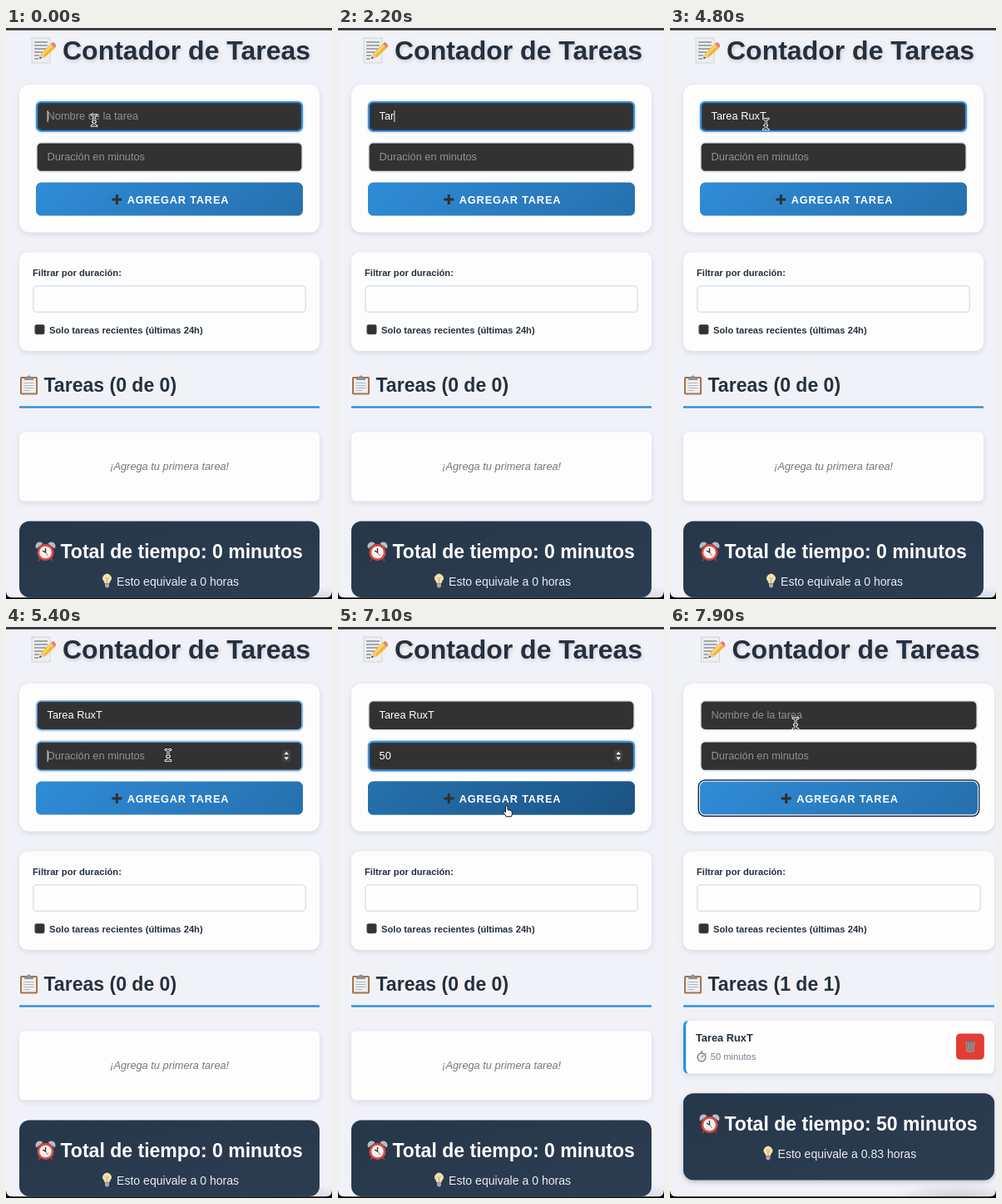
Recreate the animation shown at these times as an HTML page. Size 392 by 686 pixels, loop 8000 ms.

```html
<!DOCTYPE html>
<html lang="es">
<head>
<meta charset="utf-8">
<title>Contador de Tareas</title>
<style>
html, body { margin: 0; width: 100%; height: 100%; overflow: hidden; background: #08080a; }
svg { display: block; width: 392px; height: 686px; --w: 0px;
  font-family: "Liberation Sans", Arial, sans-serif; font-size: 12.8px; fill: #24303f; }
svg.wide { --w: 13px; }
.grow { width: calc(var(--b) + var(--w)); }
.mid { transform: translateX(calc(var(--w) / 2)); }
.bold { font-weight: bold; }
.small { font-size: 11.2px; }
.head { font-size: 23.04px; }
.center { text-anchor: middle; }
.card { fill: #fdfdfe; filter: drop-shadow(0 2px 3px rgba(30, 40, 60, .13)); }
.line { fill: #2d8fdc; }
.field { fill: #323232; stroke: #dfe4ee; stroke-width: 1.6; }
.focus { fill: none; stroke: #2f8fe0; stroke-width: 1.8; filter: drop-shadow(0 0 1.5px rgba(47, 143, 224, .45)); }
.hint { fill: #8c9299; }
.typed { fill: #fff; }
.title { font-size: 32px; filter: drop-shadow(1px 2px 2px rgba(0, 0, 0, .16)); }
.wide .before, svg:not(.wide) .after { display: none; }
.wide .total { transform: translateY(-32px); }
</style>
</head>
<body>
<svg id="stage" viewBox="0 0 392 686">
  <defs>
    <linearGradient id="blue" gradientUnits="userSpaceOnUse" x1="106" y1="115" x2="287" y2="296">
      <stop stop-color="#2f8cd7"/><stop offset="1" stop-color="#2670ae"/>
    </linearGradient>
    <linearGradient id="navy" gradientUnits="userSpaceOnUse" x1="106" y1="115" x2="287" y2="296">
      <stop stop-color="#2671ae"/><stop offset="1" stop-color="#1b5383"/>
    </linearGradient>
    <linearGradient id="slate" x2="1" y2="1">
      <stop stop-color="#27374a"/><stop offset="1" stop-color="#2c3d51"/>
    </linearGradient>
    <radialGradient id="shade">
      <stop stop-color="#556" stop-opacity=".22"/><stop offset="1" stop-color="#556" stop-opacity="0"/>
    </radialGradient>
  </defs>

  <path d="M0 0H392V677Q392 684.6 384 684.6H8Q0 684.6 0 677Z" fill="#f1f2f8"/>
  <ellipse cx="345" cy="685" rx="80" ry="17" fill="url(#shade)"/>
  <rect width="392" height="2.8" fill="#393239"/>

  <!-- title -->
  <g class="mid">
    <g transform="translate(30 11)">
      <path d="M1 1H23V31H1Z" fill="#eceef0" stroke="#c9ccd0" stroke-width=".8"/>
      <path d="M4 6H20M4 10H20M4 14H18M4 18H14M4 22H10M4 26H9" stroke="#8b9096" stroke-width="1.3"/>
      <path d="M10 26L12 20L24 8L29 13L17 24Z" fill="#f3b63a"/>
      <path d="M13.5 21.5L25 10" stroke="#ffdc72" stroke-width="1.8"/>
      <path d="M24 8L26 6Q30 7 30 11L29 13Z" fill="#df7f78"/>
      <path d="M10 26L12 20L17 24Z" fill="#e9c89b"/>
      <path d="M10 26L10.8 23.6L13 25Z" fill="#333"/>
    </g>
    <text class="bold title" x="68" y="38">Contador de Tareas</text>
  </g>

  <!-- form -->
  <rect class="card grow" style="--b:361px" x="16" y="68" height="177.5" rx="12"/>
  <g id="name">
    <rect class="field grow" style="--b:319.4px" x="36.8" y="88.8" height="35" rx="5.6"/>
    <rect class="focus grow" style="--b:319.4px" x="36.8" y="88.8" height="35" rx="5.6"/>
    <text class="hint" x="49.6" y="110.2">Nombre de la tarea</text>
    <text class="typed" x="49.6" y="110.2"></text>
    <rect class="caret" y="99" width="1" height="14" fill="#e8e8e8"/>
  </g>
  <g id="minutes">
    <rect class="field grow" style="--b:319.4px" x="36.8" y="137.6" height="35" rx="5.6"/>
    <rect class="focus grow" style="--b:319.4px" x="36.8" y="137.6" height="35" rx="5.6"/>
    <text class="hint" x="49.6" y="159">Duración en minutos</text>
    <text class="typed" x="49.6" y="159"></text>
    <rect class="caret" y="148" width="1" height="14" fill="#e8e8e8"/>
    <g id="spinner">
      <rect x="332" y="147.500" width="10.500" height="14.500" rx="2.500" fill="#404040"/>
      <path d="M334.300 153.300L337.200 149.800L340.100 153.300ZM334.300 156.300L337.200 159.800L340.100 156.300Z" fill="#f4f4f4"/>
    </g>
  </g>
  <g id="button">
    <rect class="grow" style="--b:321px" x="36" y="185.600" height="40" rx="6.400" fill="url(#blue)"/>
    <rect id="hover" class="grow" style="--b:321px" x="36" y="185.600" height="40" rx="6.400" fill="url(#navy)"/>
    <g id="ring" fill="none">
      <rect class="grow" style="--b:322.200px" x="35.400" y="185" height="41.200" rx="7" stroke="#fff" stroke-width="1.200"/>
      <rect class="grow" style="--b:324.400px" x="34.300" y="183.900" height="43.400" rx="8" stroke="#17324f" stroke-width="1.500"/>
    </g>
    <g class="mid">
      <path d="M127.300 206H139.300M133.300 200V212" stroke="#2d3033" stroke-width="3"/>
      <text class="bold" x="145.800" y="210.700" fill="#fff" letter-spacing=".8">AGREGAR TAREA</text>
    </g>
  </g>

  <!-- filters -->
  <rect class="card grow" style="--b:361px" x="16" y="269.500" height="118.500" rx="10"/>
  <text class="bold small" x="32" y="297.500">Filtrar por duración:</text>
  <rect class="grow" style="--b:327.400px" x="32.800" y="309.800" height="31.600" rx="4.500" fill="#fefefe" stroke="#dde2eb" stroke-width="1.600"/>
  <rect x="34.800" y="356.500" width="11.400" height="11.400" rx="1.800" fill="#333" stroke="#5b5b5b" stroke-width=".6"/>
  <text class="bold small" x="52" y="367.200">Solo tareas recientes (últimas 24h)</text>

  <!-- task list -->
  <g transform="translate(17 417)">
    <rect y="2" width="21" height="21.500" rx="1.500" fill="#a5744d"/>
    <rect x="2" y="4" width="17" height="17.500" fill="#eceef0"/>
    <path d="M4.500 9.500H16.500M4.500 12.500H16.500M4.500 15.500H16.500M4.500 18.500H12" stroke="#b3b7bc"/>
    <path d="M5 6V3.500H8Q8 .5 10.500 .5T13 3.500H16V6Z" fill="#8d9297"/>
  </g>
  <text id="heading" class="bold head" x="45.500" y="436.800"></text>
  <rect class="line grow" style="--b:361px" x="16" y="454.300" height="2.400"/>

  <g class="before">
    <rect class="card" x="16" y="485.500" width="361" height="83" rx="6"/>
    <text class="center" x="196.700" y="531" font-style="italic" fill="#74787d">¡Agrega tu primera tarea!</text>
  </g>
  <g id="task" class="after">
    <rect class="card" x="16" y="473" width="374" height="63.500" rx="6.400"/>
    <path class="line" d="M22.400 473Q16 473 16 479.400V530.100Q16 536.500 22.400 536.500Q19.200 535 19.200 530.100V479.400Q19.200 474.500 22.400 473Z"/>
    <text class="bold" x="31" y="498">Tarea RuxT</text>
    <g fill="none" stroke="#858a90">
      <circle cx="38" cy="517" r="4.900" fill="#eef0f2" stroke-width="1.500"/>
      <path d="M38 517L40.300 514.500M36.300 510H39.700M38 510V512M42.500 511.800L43.600 513" stroke-width="1.200"/>
    </g>
    <text class="small" x="48.700" y="520" fill="#73808c">50 minutos</text>
    <rect x="344" y="488.500" width="33.800" height="31.300" rx="4.800" fill="#e23c34"/>
    <path d="M355.300 498.500H366.700L365.500 511H356.500Z" fill="#a38c8b"/>
    <path d="M357.500 500L358.500 510M361 500V510M364.500 500L363.500 510" stroke="#766463" stroke-width=".9"/>
    <ellipse cx="361" cy="498.300" rx="6.300" ry="1.500" fill="#81706f"/>
  </g>

  <!-- total -->
  <g class="total">
    <rect class="grow" style="--b:361px" x="16" y="592.500" height="91.500" rx="12" fill="url(#slate)"/>
    <rect class="grow after" style="--b:361px" x="16" y="592.500" height="104" rx="12" fill="url(#slate)" filter="drop-shadow(0 2px 3px rgba(20,30,50,.25))"/>
    <g class="total-text">
      <g transform="translate(35.500 617)">
        <path d="M5.500 20L3.500 23.500M18.500 20L20.500 23.500" stroke="#8d3a35" stroke-width="2"/>
        <path d="M1 8.500A5 5 0 0 1 9 2.500ZM23 8.500A5 5 0 0 0 15 2.500Z" fill="#b9bdc2"/>
        <circle cx="12" cy="13" r="10" fill="#df4a40"/>
        <circle cx="12" cy="13" r="7.300" fill="#f3f3f3"/>
        <path d="M12 8V13L8.500 11" fill="none" stroke="#333" stroke-width="1.400"/>
        <path d="M12 13L15 17" stroke="#df4a40"/>
      </g>
      <text id="total" class="bold head" x="65.500" y="637.300" fill="#fff"></text>
    </g>
    <g id="equal">
      <path d="M118.700 667.500Q118.700 666 117.300 664.300A5.300 5.300 0 1 1 125.700 664.300Q124.300 666 124.300 667.500Z" fill="#f1e0ae"/>
      <path d="M119.500 660L121.500 662L123.500 660M121.500 662V667" fill="none" stroke="#c79c4c" stroke-width=".8"/>
      <path d="M119 668H124V671L122.500 672.500H120.500L119 671Z" fill="#a4a8ac"/>
      <text id="hours" x="133" y="670" font-size="14.080" fill="#e9ecf0"></text>
    </g>
  </g>
  <path d="M0 677Q0 684.600 8 684.600H384Q392 684.600 392 677V686H0Z" fill="#08080a"/>

  <!-- pointer -->
  <g id="pointer">
    <g id="beam" fill="none" stroke-linecap="round">
      <path id="beamShape" d="M-3-6.500Q0-6.500 0-4.500Q0-6.500 3-6.500M0-4.500V4.500M-3 6.500Q0 6.500 0 4.500Q0 6.500 3 6.500M-1.500 1.500H1.500" stroke="#fff" stroke-width="2.600"/>
      <use href="#beamShape"/>
      <path d="M-3-6.500Q0-6.500 0-4.500Q0-6.500 3-6.500M0-4.500V4.500M-3 6.500Q0 6.500 0 4.500Q0 6.500 3 6.500M-1.500 1.500H1.500" stroke="#222" stroke-width="1.100"/>
    </g>
    <path id="hand" d="M-2.500-5Q-2.500-6.200-1.300-6.200T0-5V-1.200Q1-2 2-.9Q3-1.400 3.900-.3Q5.300-.4 5.300 1V3.300Q5.300 5 4.300 6.800H-1.800Q-2.600 5-4.800 2.500Q-5.600 1.300-4.700 .7T-2.500 1.700Z" fill="#fff" stroke="#111" stroke-width="1"/>
  </g>
</svg>
<script>
const LOOP = 8000, STEP = 100, DONE = 7400;
const $ = id => document.getElementById(id);
const stage = $("stage");

// Time of each keystroke.
const nameText = "Tarea RuxT";
const nameKeys = [1600, 1900, 2200, 2300, 2500, 2700, 3000, 3400, 3600, 4300];
const minuteKeys = [5900, 6300];

// Pointer stops: time, x, y.
const stops = [[0, 106, 111], [4700, 106, 111], [5200, 195, 154], [6800, 195, 154],
  [6900, 204, 221], [7550, 204, 221], [7850, 151, 116], [LOOP, 151, 116]];

const ramp = (t, a, b) => Math.min(1, Math.max(0, (t - a) / (b - a)));
const smooth = x => x * x * (3 - 2 * x);
const within = (t, a, b) => t >= a && t < b;
const show = (el, on) => { el.style.visibility = on ? "visible" : "hidden"; };

function pointerAt(t) {
  const i = stops.findIndex((s, k) => t < stops[k + 1][0]);
  const [a, x, y] = stops[i], [b, u, v] = stops[i + 1];
  const p = smooth(ramp(t, a, b));
  return [x + (u - x) * p, y + (v - y) * p];
}

function drawField(id, text, focus, caretOn) {
  const part = name => $(id).querySelector(name);
  const typed = part(".typed");
  typed.textContent = text;
  typed.style.whiteSpace = "pre";
  show(part(".hint"), !text);
  part(".focus").style.opacity = focus;
  const caret = part(".caret");
  caret.setAttribute("x", 49.6 + (text ? typed.getComputedTextLength() : 0));
  show(caret, caretOn);
}

// The caret stays lit for half a second after its last reset, then blinks.
function blink(t, resets) {
  const last = resets.filter(k => k <= t).pop();
  return Math.floor((t - last) / 500) % 2 === 0;
}

function draw(t) {
  const done = t >= DONE;
  stage.classList.toggle("wide", done);

  const typed = (text, keys) => done ? "" : text.slice(0, keys.filter(k => k <= t).length);
  const nameCaret = t < 5300 && !within(t, 200, 700) && blink(t, [-300, 700, ...nameKeys]);
  const minuteCaret = within(t, 5300, 7100) && blink(t, [5300, ...minuteKeys]);
  drawField("name", typed(nameText, nameKeys), 1 - ramp(t, 5250, 5550), nameCaret);
  drawField("minutes", typed("50", minuteKeys), ramp(t, 5250, 5550) - ramp(t, 7150, 7600), minuteCaret);
  show($("spinner"), within(t, 5100, 7200));

  const hover = ramp(t, 6800, 6900) - ramp(t, 7600, 7850);
  const pressed = within(t, 7100, 7300);
  $("hover").style.opacity = hover;
  $("button").setAttribute("transform", `translate(0 ${pressed ? 0 : -2 * hover})`);
  show($("ring"), t >= 7200);

  $("heading").textContent = done ? "Tareas (1 de 1)" : "Tareas (0 de 0)";
  $("total").textContent = `Total de tiempo: ${done ? 50 : 0} minutos`;
  $("hours").textContent = `Esto equivale a ${done ? "0.83" : 0} horas`;
  $("equal").setAttribute("transform", `translate(${done ? -3.5 : 0} 0)`);

  const enter = 1 - (1 - ramp(t, 7350, 7850)) ** 2;
  $("task").style.opacity = enter;
  $("task").setAttribute("transform", `translate(0 ${16 * (1 - enter)})`);

  const [x, y] = pointerAt(t);
  const visible = !within(t, 1600, 4700) && !within(t, 5900, 6800);
  $("pointer").setAttribute("transform", `translate(${x} ${y})`);
  show($("beam"), visible && y < 180);
  show($("hand"), visible && y >= 180);
}

function tick() {
  const t = performance.now() % LOOP;
  draw(Math.floor(t / STEP) * STEP);
  requestAnimationFrame(tick);
}
draw(0);
tick();
</script>
</body>
</html>
```
